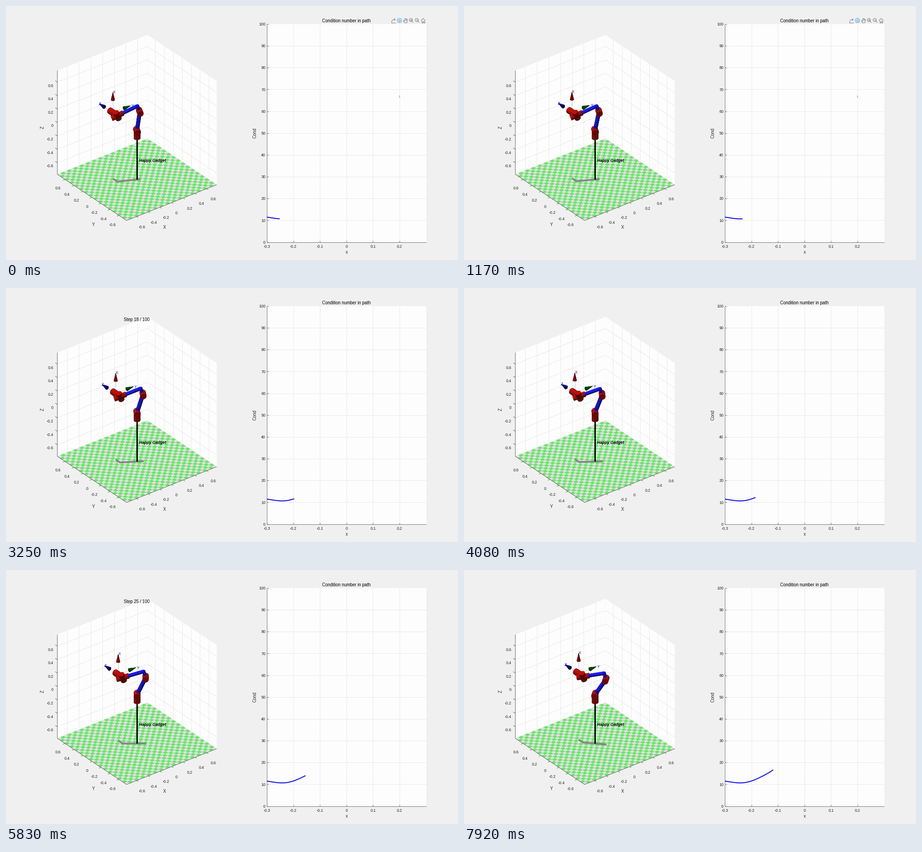
Write a matplotlib script that moves like this. It is 998 by 561 pixels and loops after 8 s.

```python
import numpy as np
import matplotlib.pyplot as plt
from matplotlib.animation import FuncAnimation
from matplotlib.collections import LineCollection, PolyCollection

W, H, DPI = 998, 561, 100
PT = 72 / DPI                      # points per pixel
INTERVAL, FRAMES = 80, 100
TICK, LABEL = 8.8, 9.6             # font sizes in pixels
DARK, GRID = "#262626", "#e4e4e2"
BLUE, RED = (0.10, 0.10, 1.0), (0.74, 0.06, 0.04)

plt.rcParams["font.family"] = "Liberation Sans"
fig = plt.figure(figsize=(W / DPI, H / DPI), dpi=DPI, facecolor="#f0f0f0")
ax = fig.add_axes([0, 0, 1, 1])
ax.set_xlim(0, W)
ax.set_ylim(H, 0)
ax.axis("off")


# ---------- drawing helpers (pixel coordinates) ----------
def text(x, y, s, px=TICK, color=DARK, ha="center", rot=0, **kw):
    """Text whose capitals are centred on (x, y)."""
    shift = 0.36 * px
    x, y = (x + shift, y) if rot else (x, y + shift)
    return ax.text(x, y, s, fontsize=px * PT, color=color, ha=ha, va="baseline",
                   rotation=rot, rotation_mode="anchor", zorder=9, **kw)


def lines(segs, color, width=0.8, z=3):
    return ax.add_collection(LineCollection(
        segs, colors=color, linewidths=width * PT, zorder=z))


def area(pts, color, z=1):
    ax.add_collection(PolyCollection([pts], facecolors=color,
                                     edgecolors="none", zorder=z))


def num(v):
    return f"{v:.1f}" if abs(v) > 0.01 else "0"


# ---------- 3D projection ----------
ORIGIN = np.array([289.3, 268.7])
BASIS = np.array([[128.9, -51.2], [-99.1, -66.1], [0, -148.3]])
VIEW = np.array([-0.527, -0.687, 0.5])       # towards the camera
LIGHT = np.array([-0.36, -0.05, 0.93])
LIM = 0.772
TICKS = np.linspace(-0.6, 0.6, 7)


def project(pts):
    return ORIGIN + np.asarray(pts, float) @ BASIS


def proj(x, y, z):
    return project((x, y, z))


def draw_room():
    a = LIM
    area([proj(-a, a, -a), proj(a, a, -a), proj(a, a, a), proj(-a, a, a)], "#fdfdfd")
    area([proj(a, a, -a), proj(a, -a, -a), proj(a, -a, a), proj(a, a, a)], "#fdfdfd")
    grid = []
    for t in TICKS:
        grid += [[proj(t, a, -a), proj(t, a, a)],
                 [proj(a, t, -a), proj(a, t, a)],
                 [proj(-a, a, t), proj(a, a, t), proj(a, -a, t)]]
    lines(grid, GRID, 0.8, 2)

    # checkered floor
    area([proj(-a, -a, -a), proj(a, -a, -a), proj(a, a, -a), proj(-a, a, -a)],
         "#e0e0e0", 3)
    n = 29
    e = np.linspace(-a, a, n + 1)
    tiles = [[proj(e[i], e[j], -a), proj(e[i + 1], e[j], -a),
              proj(e[i + 1], e[j + 1], -a), proj(e[i], e[j + 1], -a)]
             for i in range(n) for j in range(n) if (i + j) % 2]
    ax.add_collection(PolyCollection(tiles, facecolors="#69e569",
                                     edgecolors="none", zorder=3.1))

    edges = [[proj(-a, a, a), proj(-a, a, -a), proj(-a, -a, -a), proj(a, -a, -a)]]
    d = 0.035
    for t in TICKS:
        edges += [[proj(t, -a, -a), proj(t, -a - d, -a)],
                  [proj(-a, t, -a), proj(-a - d, t, -a)],
                  [proj(-a, a, t), proj(-a, a + d + 0.01, t)]]
    lines(edges, "#484848", 0.8, 4)

    for i, t in enumerate(TICKS):
        nudge = -3.5 if i == 3 else 0
        text(300.2 + 26.3 * i + nudge, 488 - 10.35 * i, num(t))
        text(243 - 20.4 * i, 483.3 - 13.5 * i, num(t), ha="right")
        text(105, 353 - 29.6 * i, num(t), ha="right")
    text(350, 489, "X", LABEL)
    text(193, 482.5, "Y", LABEL)
    text(80.5, 268.5, "Z", LABEL, rot=90)
    text(294.5, 340.5, "Happy Gadget", color="k", ha="left",
         weight="bold", style="italic")


# ---------- right-hand chart ----------
LEFT, RIGHT, TOP, BOTTOM = 576, 927.6, 40, 521.5


def draw_chart():
    area([(LEFT, TOP), (RIGHT, TOP), (RIGHT, BOTTOM), (LEFT, BOTTOM)], "#fdfdfd")
    xs = LEFT + 58.6 * np.arange(6)
    ys = BOTTOM - 48.15 * np.arange(11)
    lines([[(x, TOP), (x, BOTTOM)] for x in xs[1:]]
          + [[(LEFT, y), (RIGHT, y)] for y in ys[1:-1]], GRID, 0.8, 2)
    lines([[(LEFT, TOP), (LEFT, BOTTOM), (RIGHT, BOTTOM)]]
          + [[(x, BOTTOM), (x, BOTTOM - 4)] for x in xs]
          + [[(LEFT, y), (LEFT + 4, y)] for y in ys], "#555555", 0.8)
    for i, x in enumerate(xs):
        text(x, 531.3, num(-0.3 + 0.1 * i))
    for i, y in enumerate(ys):
        text(573, y, str(10 * i), ha="right")
    text(752, 543.2, "x", LABEL)
    text(549.3, 280.5, "Cond", LABEL, rot=90)
    text(751.6, 32.5, "Condition number in path", LABEL, "k")


def ring(cx, cy, r):
    a = np.linspace(0, 2 * np.pi, 25)
    return np.column_stack([cx + r * np.cos(a), cy + r * np.sin(a)])


def toolbar():
    grey = [[(851, 33), (851, 36.5), (860, 36.5)],
            [(852.5, 33.5), (853.5, 31), (856, 30), (859, 30)],
            [(857, 27.8), (859.5, 30), (857, 32.2)],
            # hand
            [(880, 37), (877.5, 33), (878.3, 32.2), (880, 33.5), (880, 28.5),
             (882, 27.5), (884, 28.2), (886.2, 30), (886, 34), (884.8, 37),
             (880, 37)],
            [(881.8, 28), (881.8, 31.5)], [(883.9, 28.5), (883.9, 31.5)],
            # home
            [(916, 32.5), (921, 27.5), (926, 32.5)],
            [(917.6, 31.5), (917.6, 37), (920, 37), (920, 33.5), (922.2, 33.5),
             (922.2, 37), (924.5, 37), (924.5, 31.5)]]
    for cx in (894, 907):
        grey += [ring(cx, 31, 3.5), [(cx + 2.6, 33.6), (cx + 5.5, 36.7)],
                 [(cx - 1.8, 31), (cx + 1.8, 31)]]
    grey.append([(894, 29.2), (894, 32.8)])
    blue = [ring(868.8, 32, 4.9), ring(868.8, 32.2, 2.1),
            [(868.8, 32), (868.8, 34.5)]]
    return [lines(grey, "#6e6e6e", 0.9, 6), lines(blue, "#46a9e0", 1.0, 6)]


# ---------- robot ----------
A2, A3, D4, D6 = 0.28, 0.095, 0.297, 0.1      # link lengths
BASE_Z, SHOULDER_Z = -0.11, -0.045
SIDES = 18


def unit(v):
    v = np.asarray(v, float)
    return v / np.linalg.norm(v)


def tube(p, q, r0, r1, color, parts=4):
    """Visible shaded faces of a cylinder or cone from p to q."""
    p, q = np.asarray(p, float), np.asarray(q, float)
    axis, length = unit(q - p), np.linalg.norm(q - p)
    u = unit(np.cross(axis, (0.31, 0.17, 0.9) if abs(axis[2]) < 0.9 else (1, 0, 0)))
    v = np.cross(axis, u)
    ang = np.linspace(0, 2 * np.pi, SIDES + 1)
    spokes = np.outer(np.cos(ang), u) + np.outer(np.sin(ang), v)
    rings = [p + (q - p) * t + spokes * (r0 + (r1 - r0) * t)
             for t in np.linspace(0, 1, parts + 1)]
    faces = []

    def add(pts, normal):
        if normal @ VIEW <= 0:
            return
        shade = 0.38 + 0.62 * max(0, normal @ LIGHT)
        faces.append((pts.mean(0) @ VIEW, project(pts),
                      np.clip(np.array(color) * shade, 0, 1)))

    for j in range(SIDES):
        normal = unit(spokes[j] + spokes[j + 1] + axis * 2 * (r0 - r1) / length)
        for a, b in zip(rings, rings[1:]):
            add(np.array([a[j], a[j + 1], b[j + 1], b[j]]), normal)
    add(rings[0][:-1], -axis)
    if r1 > 0:
        add(rings[-1][:-1], axis)
    return faces


def joint(centre, axis, half, radius):
    d = unit(axis) * half
    return tube(centre - d, centre + d, radius, radius, RED)


def solve_arm(step):
    """Joint positions that put the tool on its straight path."""
    wrist = np.array([-0.3 + 0.6 / 99 * (step - 1), 0.119, 0.21])
    reach = np.hypot(wrist[0], wrist[1])
    h = np.array([wrist[0], wrist[1], 0]) / reach
    up = np.array([0, 0, 1.0])
    rise = wrist[2] - SHOULDER_Z
    dist, diag = np.hypot(reach, rise), np.hypot(A3, D4)
    ang = np.arctan2(rise, reach) + np.arccos(
        (A2 ** 2 + dist ** 2 - diag ** 2) / (2 * A2 * dist))
    shoulder = up * SHOULDER_Z
    elbow = shoulder + A2 * (np.cos(ang) * h + np.sin(ang) * up)
    v = wrist - elbow
    bend = np.arctan2(v[2], v @ h) + np.arccos(A3 / diag)
    knee = elbow + A3 * (np.cos(bend) * h + np.sin(bend) * up)
    tool = wrist + (0, D6, 0)
    return shoulder, elbow, knee, wrist, tool, np.array([h[1], -h[0], 0])


# direction, cone colour, rod colour, label, label offset
TOOL_AXES = [((0, 0, 1.0), (0.62, 0.05, 0.05), "#a9cbe0", "X", (2.7, -1.5)),
             ((1.0, 0, 0), (0.0, 0.36, 0.02), "#dcdca0", "Y", (5.3, -0.3)),
             ((0, 1.0, 0), (0.04, 0.04, 0.55), "#c9c9d8", "Z", (1.2, -0.3))]

draw_room()
draw_chart()
icons = toolbar()
cursor = lines([[(868.4, 196.8), (868.4, 201.6)], [(870, 201.2), (871.2, 201.2)]],
               "#a09a94", 1, 6)
lines([[proj(0, 0, -LIM), proj(0, 0, BASE_Z)]], "k", 3, 5)
shadow, = ax.plot([], [], color="#858585", lw=3.8 * PT, zorder=4.5,
                  solid_capstyle="butt", solid_joinstyle="round")
curve, = ax.plot([], [], color="#0808e4", lw=2 * PT, zorder=5,
                 solid_capstyle="butt")
rods = lines([], [a[2] for a in TOOL_AXES], 0.9, 5.5)
body = ax.add_collection(PolyCollection([], linewidths=0.35, zorder=7))
names = [text(0, 0, a[3], color="#1414d2") for a in TOOL_AXES]
title = text(289, 69.7, "", LABEL, "k")

# smooth condition-number curve through a few points
KNOT_X = np.array([576, 590, 604, 611, 617, 622, 636, 654, 671.5, 682])
KNOT_Y = [466.3, 468.5, 469.8, 470.2, 470.1, 469.4, 465.2, 458, 448.5, 441.8]
FIT = np.polyfit((KNOT_X - 629) / 53, KNOT_Y, 6)


def draw_robot(step):
    shoulder, elbow, knee, wrist, tool, side = solve_arm(step)
    fore = unit(wrist - knee)
    y_axis = np.array([0, 1.0, 0])
    base = np.array([0, 0, BASE_Z])
    faces = (joint(base, (0, 0, 1), 0.05, 0.043)
             + joint(shoulder, side, 0.052, 0.043)
             + tube(shoulder, elbow, 0.026, 0.026, BLUE, 8)
             + joint(elbow, side, 0.055, 0.041)
             + tube(elbow, knee + (0, 0, 0.012), 0.02, 0.02, BLUE)
             + tube(knee, wrist, 0.022, 0.022, BLUE, 8)
             + joint(wrist, fore, 0.085, 0.034)
             + joint(wrist, np.cross(fore, y_axis), 0.06, 0.04)
             + joint(tool, y_axis, 0.07, 0.042))
    segs = []
    for (d, color, _, _, off), label in zip(TOOL_AXES, names):
        d = np.array(d)
        tip, root = tool + 0.3 * d, tool + 0.19 * d
        faces += tube(root, tip, 0.025, 0, color)
        segs.append([project(tool), project(root)])
        x, y = project(tip) + off
        label.set_position((x, y + 0.36 * TICK))
    faces.sort(key=lambda f: f[0])
    colors = [f[2] for f in faces]
    body.set_verts([f[1] for f in faces])
    body.set_facecolor(colors)
    body.set_edgecolor(colors)
    rods.set_segments(segs)
    floor = [proj(p[0], p[1], -LIM) for p in (tool, wrist, knee, elbow, base)]
    shadow.set_data(*np.transpose(floor))


def update(i):
    tick = 1000 / 12
    t = (i * INTERVAL + 60) // tick * tick
    pos = np.interp(t, [0, 500, 1920, 8000], [10.05, 11.7, 14.9, 32.27])
    step, part = int(pos), pos % 1
    draw_robot(step)
    title.set_text(f"Step {step} / 100" if part >= 0.3 else "")
    done = step if part >= 0.55 else step - 1
    x = LEFT + 3.552 * np.arange(done)
    curve.set_data(x, np.polyval(FIT, (x - 629) / 53))
    cursor.set_visible(t < 2080)
    for icon in icons:
        icon.set_alpha(float(np.clip((2920 - t) / 500, 0, 1)))
    return []


anim = FuncAnimation(fig, update, frames=FRAMES, interval=INTERVAL,
                     init_func=lambda: update(0), repeat=True, repeat_delay=0)
plt.show()
```
